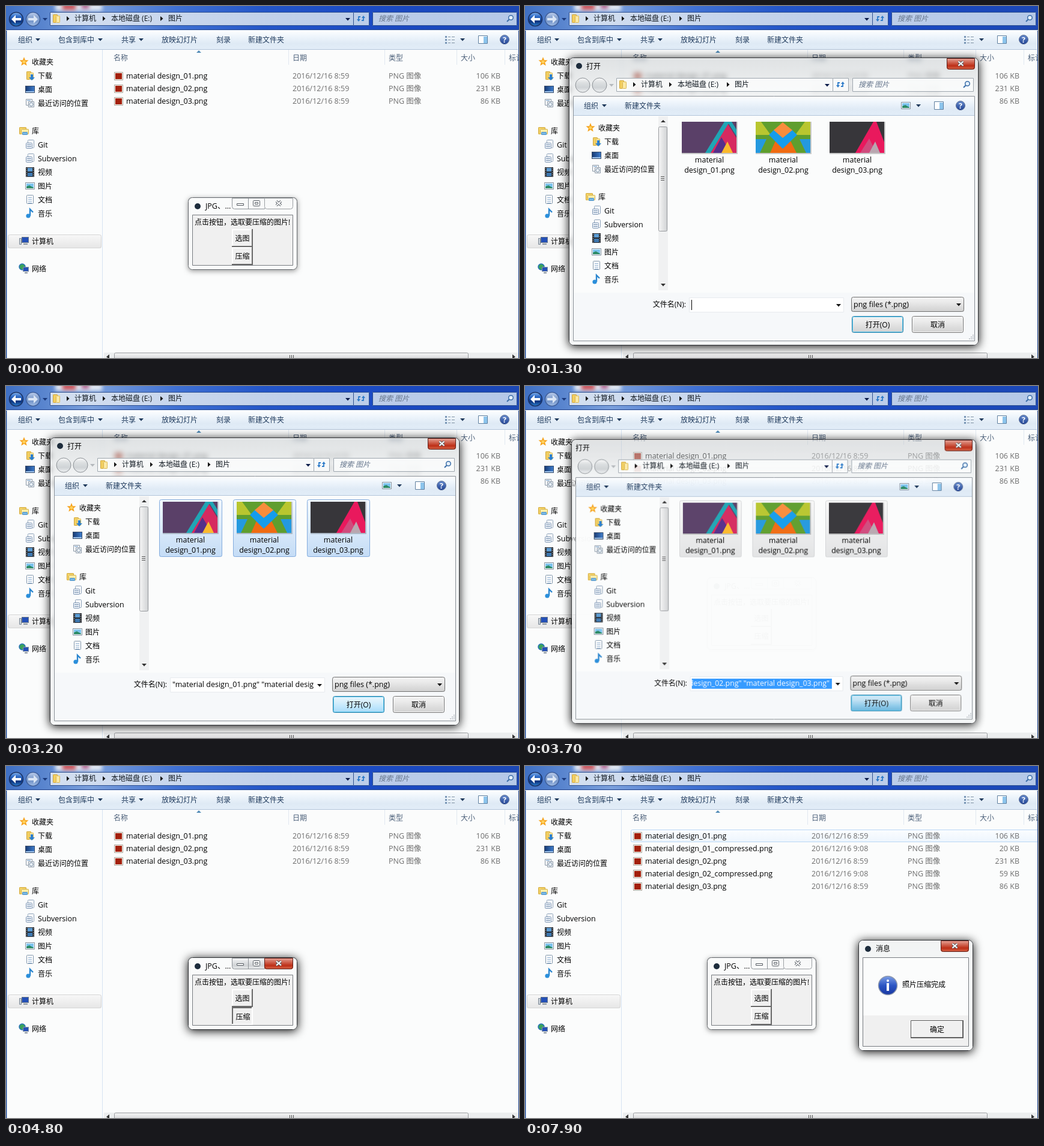
Write an HTML page with a canvas that moves like this. It is 854 px wide and 587 px high and loops after 8000 ms.

```html
<!DOCTYPE html>
<html lang="zh">
<head>
<meta charset="utf-8">
<style>
html, body { margin: 0; width: 100%; height: 100%; overflow: hidden; background: #fbfcfc; }
canvas { position: absolute; left: 0; top: 0; }
</style>
</head>
<body>
<canvas id="base" width="854" height="587"></canvas>
<canvas id="pop" width="854" height="587"></canvas>
<script>
const base = document.getElementById('base'), pop = document.getElementById('pop');
const baseCtx = base.getContext('2d'), popCtx = pop.getContext('2d');
let g = baseCtx;
const clamp = v => Math.max(0, Math.min(1, v));

// ---- drawing helpers
function grad(x0, y0, x1, y1, ...stops) {
  const f = g.createLinearGradient(x0, y0, x1, y1);
  stops.forEach((s, i) => f.addColorStop(i / (stops.length - 1), s));
  return f;
}
const down = (y, h, ...stops) => grad(0, y, 0, y + h, ...stops);
function rect(x, y, w, h, fill, stroke, r = 0) {
  if (fill) {
    g.fillStyle = fill;
    g.beginPath(); g.roundRect(x, y, w, h, r); g.fill();
  }
  if (stroke) {
    g.strokeStyle = stroke; g.lineWidth = 1;
    g.beginPath(); g.roundRect(x + .5, y + .5, w - 1, h - 1, r); g.stroke();
  }
}
function poly(x, y, fill, ...p) {
  g.fillStyle = fill;
  g.beginPath();
  for (let i = 0; i < p.length; i += 2) g.lineTo(x + p[i], y + p[i + 1]);
  g.fill();
}
function line(color, width, ...p) {
  g.strokeStyle = color; g.lineWidth = width;
  g.beginPath();
  for (let i = 0; i < p.length; i += 2) g.lineTo(p[i], p[i + 1]);
  g.stroke();
}
function disc(x, y, r, fill, stroke, width = 1) {
  g.beginPath(); g.arc(x, y, r, 0, 7);
  if (fill) { g.fillStyle = fill; g.fill(); }
  if (stroke) { g.strokeStyle = stroke; g.lineWidth = width; g.stroke(); }
}
function text(s, x, y, color = '#000', align = 'left', style = '') {
  const size = /^[\x00-\x7f]/.test(s) ? 12.5 : 12;
  g.font = `${style} ${size}px "Open Sans", "Noto Sans CJK SC", "Noto Sans CJK JP", sans-serif`;
  g.fillStyle = color; g.textAlign = align;
  g.fillText(s, x, y);
}
const arrowDown = (x, y, c = '#1e395b') => poly(x, y, c, -4, -2, 4, -2, 0, 2.5);
const arrowRight = (x, y) => poly(x, y, '#111', -2, -4, 2.5, 0, -2, 4);
function clipped(path, draw) {
  g.save(); g.beginPath(); path(); g.clip('evenodd'); draw(); g.restore();
}

// ---- icons, centred on x, y
const icons = {
  star(x, y) {
    const p = [];
    for (let i = 0; i < 10; i++) {
      const a = i * Math.PI / 5 - Math.PI / 2, r = i % 2 ? 3.4 : 8;
      p.push(Math.cos(a) * r, Math.sin(a) * r);
    }
    poly(x, y, '#f6a21c', ...p);
    disc(x, y, 2.6, '#ffd25a');
  },
  folder(x, y) {
    rect(x - 6, y - 7, 8, 14, '#f2cf61', '#cfa53c', 1);
    rect(x - 1, y - 5, 7, 12, '#fbe9a5', '#d9b550', 1);
  },
  down(x, y) {
    icons.folder(x, y);
    poly(x + 3, y + 3, '#2a7fd0', -2, -5, 2, -5, 2, 0, 5, 0, 0, 5, -5, 0, -2, 0);
  },
  desk(x, y) {
    rect(x - 8, y - 6, 16, 12, grad(x - 8, y, x + 8, y, '#16376f', '#3f7fd0'), '#3a4d68');
    rect(x - 7, y + 3, 14, 2, '#9ec2ea');
  },
  recent(x, y) {
    rect(x - 7, y - 7, 11, 11, '#f7f8f9', '#8d9aa8');
    rect(x - 3, y - 3, 10, 10, '#f7f8f9', '#8d9aa8');
    line('#6e9cc9', 1, x - 5, y - 4.5, x + 1, y - 4.5);
    disc(x + 2, y + 2, 3, '#e9f0f6', '#7c91a6');
  },
  lib(x, y) {
    rect(x - 8, y - 6, 12, 12, '#f5d467', '#cfa53c', 1);
    rect(x - 5, y - 3, 13, 9, '#fdeea9', '#d0ac48', 1);
    rect(x - 3, y + 2, 9, 5, '#78b8e6', '#4a8fc4', 1);
  },
  doc(x, y) {
    rect(x - 6, y - 8, 12, 15, '#fdfdfd', '#8196ab', 1);
    for (let i = -4; i < 6; i += 3) line('#8fb0d2', 1, x - 3, y + i + .5, x + 3, y + i + .5);
  },
  code(x, y) {
    rect(x - 4, y - 8, 11, 14, '#fdfdfd', '#8ba0b8', 1);
    rect(x - 7, y - 3, 11, 10, '#eef3f9', '#7d95b2', 1);
    line('#6b87a8', 1, x - 5, y + .5, x + 2, y + .5);
    line('#6b87a8', 1, x - 5, y + 3.5, x + 2, y + 3.5);
  },
  film(x, y) {
    rect(x - 7, y - 8, 14, 16, '#24282e');
    rect(x - 4, y - 7, 8, 6, '#5b9bd3'); rect(x - 4, y + 1, 8, 6, '#3e78b0');
    for (let i = -6; i < 8; i += 3) { rect(x - 6, y + i, 1, 1, '#fff'); rect(x + 5, y + i, 1, 1, '#fff'); }
  },
  pic(x, y) {
    rect(x - 8, y - 6, 16, 12, '#fff', '#7d8d9c');
    rect(x - 6, y - 4, 12, 8, '#7cc3ee');
    poly(x, y, '#2c8a66', -6, 4, -6, 1, -1, -1, 6, 3, 6, 4);
  },
  music(x, y) {
    line('#2b86cf', 2.4, x, y + 4, x, y - 7, x + 5, y - 2);
    disc(x - 3, y + 4, 3.6, '#2b8fdb');
  },
  pc(x, y) {
    rect(x - 8, y - 5, 4, 11, '#cfd6de', '#7c8894');
    rect(x - 4, y - 7, 12, 10, '#2450b8', '#707c8a');
    rect(x - 1, y + 4, 7, 2, '#8b95a0');
  },
  net(x, y) {
    disc(x - 3, y - 3, 5, '#3aa35c', '#2674b8', 1.5);
    rect(x - 2, y - 3, 10, 8, '#2450b8', '#8b95a0');
    rect(x + 1, y + 6, 5, 2, '#8b95a0');
  },
  glass(x, y) {
    disc(x + 1.5, y - 1.5, 3.8, '#e6f1fb', '#3b6ea8', 1.5);
    line('#3b6ea8', 2, x - 1.5, y + 1.5, x - 5, y + 5);
  },
  pane(x, y) {
    rect(x - 8, y - 7, 16, 14, '#fdfeff', '#5f7f9f');
    rect(x + 1, y - 5, 6, 11, '#8cc4ec');
  },
  help(x, y) {
    disc(x, y, 7.5, down(y - 8, 16, '#6b90d0', '#1c3f92'), '#5c6f96');
    text('?', x, y + 4.5, '#fff', 'center', 'bold');
  },
  png(x, y) {
    rect(x - 8, y - 7, 15, 14, '#fdfaf2', '#a9a39a');
    rect(x - 6, y - 5, 11, 10, '#a3200c');
  }
};

// ---- shared parts
const places = [
  ['star', '收藏夹', 0], ['down', '下载', 23], ['desk', '桌面', 46], ['recent', '最近访问的位置', 69],
  ['lib', '库', 115], ['code', 'Git', 138], ['code', 'Subversion', 161], ['film', '视频', 184],
  ['pic', '图片', 207], ['doc', '文档', 230], ['music', '音乐', 253]
];
function sidebar(x, y) {
  for (const [kind, label, dy] of places) {
    const dx = kind == 'star' || kind == 'lib' ? 0 : 10;
    icons[kind](x + dx, y + dy);
    text(label, x + 13 + dx, y + dy + 5);
  }
}
function addressBar(x, y, w, sx, sw, fill, border) {
  rect(x, y, w, 23, fill, border);
  rect(x + w - 1, y, 27, 23, fill, border);
  rect(sx, y, sw, 23, fill, border);
  icons.folder(x + 11, y + 11);
  [30, 90, 186].forEach(d => arrowRight(x + d, y + 11));
  text('计算机', x + 41, y + 15, '#101820');
  text('本地磁盘 (E:)', x + 102, y + 15, '#101820');
  text('图片', x + 197, y + 15, '#101820');
  arrowDown(x + w - 10, y + 12, '#0d1d4a');
  const rx = x + w + 12, ry = y + 11;
  line('#2f7cc9', 1.8, rx - 4, ry + 2, rx - 4, ry - 3, rx - 1, ry - 3);
  line('#2f7cc9', 1.8, rx + 4, ry - 2, rx + 4, ry + 3, rx + 1, ry + 3);
  poly(rx - 4, ry + 2, '#2f7cc9', -3, -1, 3, -1, 0, 3);
  poly(rx + 4, ry - 2, '#2f7cc9', -3, 1, 3, 1, 0, -3);
  text('搜索 图片', sx + 10, y + 15, '#65758c', 'left', 'italic');
  icons.glass(sx + sw - 12, y + 11);
}
function toolbar(x, y, w, h) {
  rect(x, y, w, h, down(y, h, '#fdfeff', '#edf4fb', '#dfeaf5', '#e2edf8'));
  rect(x, y + h - 1, w, 1, '#b3c5da');
}
function closeButton(x, y, w, active) {
  rect(x, y, w, 19, active ? down(y, 19, '#e8a79b', '#d26a57', '#bd2f17', '#d8694c') : '#f8f9f9',
    active ? '#5c1d17' : '#9b9fa3', [0, 0, 4, 4]);
  const cx = x + w / 2, cy = y + 9;
  const cross = (c, lw) => {
    line(c, lw, cx - 4, cy - 3.5, cx + 4, cy + 3.5);
    line(c, lw, cx + 4, cy - 3.5, cx - 4, cy + 3.5);
  };
  cross('#555b62', 4);
  cross('#fff', 2);
}
// Window frame: outer shadow, then glass over whatever lies below
function frame(x, y, w, h, active, blur) {
  const shape = () => g.roundRect(x, y, w, h, 7);
  clipped(() => { g.rect(0, 0, 854, 587); shape(); }, () => {
    g.shadowColor = active ? 'rgba(0,0,0,.95)' : 'rgba(0,0,0,.4)';
    g.shadowBlur = active ? 16 : 9;
    g.shadowOffsetY = 2;
    g.fillStyle = '#000';
    g.beginPath(); shape(); g.fill();
  });
  clipped(shape, () => {
    if (blur) {
      g.filter = 'blur(4px)';
      g.drawImage(base, 0, 0);
      g.filter = 'none';
    }
    rect(x, y, w, h, down(y, 70, 'rgba(190,195,198,.45)', 'rgba(238,240,241,.55)'));
  });
  rect(x, y, w, h, null, active ? '#2c2f33' : '#62666a', 7);
  rect(x + 1, y + 1, w - 2, h - 2, null, 'rgba(255,255,255,.85)', 6);
}
function button(x, y, w, h, label, state) {
  const fills = {
    hover: ['#eaf6fd', '#d9f0fc', '#bee6fd', '#a7d9f5'],
    press: ['#d5ecf8', '#c0e2f4', '#90cbeb', '#68b3db']
  };
  rect(x, y, w, h, down(y, h, ...(fills[state] || ['#f4f4f4', '#ebebeb', '#dddddd', '#d0d0d0'])),
    state ? '#2c7fa6' : '#707070', 3);
  rect(x + 1, y + 1, w - 2, h - 2, null, state ? '#5cc8ee' : '#fafafa', 2);
  text(label, x + w / 2, y + h / 2 + 4.5, '#000', 'center');
}
function bevel(x, y, w, h, label, pressed) {
  const [a, b] = pressed ? ['#696969', '#fff'] : ['#fff', '#696969'];
  rect(x, y, w, h, '#f0f0f0');
  line(a, 2, x + 1, y + h, x + 1, y + 1, x + w, y + 1);
  line(b, 2, x, y + h - 1, x + w - 1, y + h - 1, x + w - 1, y);
  const d = pressed ? 1 : 0;
  text(label, x + w / 2 + d, y + h / 2 + 4.5 + d, '#000', 'center');
}

// ---- file browser
const pic = (n, size, c) => [`material design_0${n}${c ? '_compressed' : ''}.png`, c ? '9:08' : '8:59', size];
const [one, two, three] = [pic(1, 106), pic(2, 231), pic(3, 86)];
const oneSmall = pic(1, 20, true), twoSmall = pic(2, 59, true);
function rowsAt(t) {
  if (t >= 7100) return [one, oneSmall, two, twoSmall, three];
  return t >= 6600 ? [one, two, three, oneSmall] : [one, two, three];
}
function explorer(t) {
  rect(0, 0, 854, 587, '#fbfcfc');
  rect(0, 0, 854, 41, grad(0, 0, 854, 0, '#3f70c4', '#7ba0dc', '#3f70d2', '#2456c8', '#1c4cc4', '#1a48be', '#1c48b4'));
  clipped(() => g.rect(0, 0, 854, 40), () => {
    g.filter = 'blur(3px)';
    rect(82, -4, 78, 12, '#e4e9f2');
    rect(94, -3, 22, 9, '#c8434a');
    rect(126, -3, 12, 7, '#a8467a');
    g.filter = 'none';
  });
  rect(0, 39, 854, 1, '#1d3f8b');
  rect(0, 40, 854, 1, '#dfeaf8');
  disc(17, 22, 11.5, down(10, 24, '#8db8ee', '#2b68c5', '#0c347f', '#2f86d6'), '#1b3263', 1.5);
  disc(45, 22, 11.5, down(10, 24, '#c3d3ee', '#8da8d4', '#7898cc', '#a6c1e8'), '#3f5f9b', 1.5);
  poly(17, 22, '#fff', -8, 0, -1, -7, -1, -2, 8, -2, 8, 2, -1, 2, -1, 7);
  poly(45, 22, '#dbe6f5', 8, 0, 1, -7, 1, -2, -8, -2, -8, 2, 1, 2, 1, 7);
  arrowDown(65, 22, '#19397d');
  addressBar(73, 10, 506, 610, 241, grad(73, 0, 851, 0, '#d3dff0', '#c0d0ea', '#b4c8e8'), '#2d4f8f');

  toolbar(2, 41, 850, 32);
  const menu = [['组织', 20, 53], ['包含到库中', 87, 157], ['共享', 192, 225], ['放映幻灯片', 259], ['刻录', 350], ['新建文件夹', 403]];
  for (const [label, x, arrow] of menu) {
    text(label, x, 61, '#1e395b');
    if (arrow) arrowDown(arrow, 56);
  }
  for (let i = 0; i < 3; i++) {
    rect(731, 50 + i * 5, 3, 3, '#7794b4');
    line('#8293a5', 1, 736, 51.5 + i * 5, 740, 51.5 + i * 5);
    line('#8293a5', 1, 742, 51.5 + i * 5, 747, 51.5 + i * 5);
  }
  arrowDown(760, 56);
  icons.pane(794, 56);
  icons.help(830, 56);

  rect(3, 381, 156, 23, down(381, 23, '#f8f8f8', '#e6e6e6'), '#d5d5d5', 3);
  sidebar(30, 93);
  icons.pc(30, 392); text('计算机', 43, 397);
  icons.net(30, 438); text('网络', 43, 443);
  rect(160, 73, 1, 514, '#d6e3f2');

  [470, 630, 750, 830].forEach(x => rect(x, 73, 1, 25, '#e1e8f0'));
  [['名称', 179], ['日期', 477], ['类型', 637], ['大小', 757], ['标记', 837]]
    .forEach(([s, x]) => text(s, x, 91, '#4c607a'));
  poly(321, 76, '#4f89b5', -4, 2, 0, -2, 4, 2);
  if (t >= 7800) rect(176, 106, 690, 21, down(106, 21, '#fbfdff', '#edf5fd'), '#b8d6f5', 2);
  rowsAt(t).forEach(([name, time, size], i) => {
    const y = 117 + i * 21;
    icons.png(188, y);
    text(name, 200, y + 4);
    text('2016/12/16 ' + time, 477, y + 4, '#6d6d6d');
    text('PNG 图像', 637, y + 4, '#6d6d6d');
    text(size + ' KB', 823, y + 4, '#6d6d6d', 'right');
  });

  rect(163, 578, 690, 9, '#eceeef');
  rect(180, 578, 590, 14, down(578, 9, '#f6f6f6', '#dcdddf'), '#979a9e', 2);
  [472, 475, 478].forEach(x => rect(x, 582, 1, 5, '#555'));
  poly(170, 585, '#333', 2, -4, -3, 0, 2, 4);
  poly(845, 585, '#333', -2, -4, 3, 0, -2, 4);
  rect(0, 41, 1, 546, '#1d448f'); rect(1, 41, 1, 546, '#a9c4ea');
  rect(853, 41, 1, 546, '#1d448f');
}

function toolWindow(t) {
  const active = t == 900 || (t >= 3900 && t < 7400);
  rect(303, 319, 182, 121, '#fbfcfc', null, 7);
  frame(303, 319, 182, 121, active);
  rect(305, 321, 178, 117, '#fafbfb', null, 5);
  disc(319, 334, 5, '#1d2c3c');
  text('JPG、...', 332, 338);
  rect(376, 320, 55, 19, active ? down(320, 19, '#fbfbfb', '#e2e4e6', '#cfd2d5', '#eceeef') : '#f8f9f9', '#8f9499', [0, 0, 0, 4]);
  rect(403, 320, 1, 19, '#8f9499');
  rect(384, 329, 12, 4, '#fff', '#555b62');
  rect(411, 324, 12, 10, '#fff', '#555b62', 1);
  rect(414, 327, 6, 4, '#fff', '#555b62');
  closeButton(430, 320, 48, active);
  rect(310, 348, 168, 85, '#f0f0f0', '#777b80');
  text('点击按钮，选取要压缩的图片!', 314, 365);
  bevel(376, 372, 35, 30, '选图', t == 900);
  bevel(376, 402, 35, 30, '压缩', t >= 4800 && t < 7400);
}

// ---- open dialog
function art(n, x, y) {
  clipped(() => g.rect(x, y, 91, 52), () => {
    const p = (fill, ...pts) => poly(x, y, fill, ...pts);
    if (n == 1) {
      p('#5a4068', 0, 0, 91, 0, 91, 52, 0, 52);
      p('#20a5b4', 39, 52, 71, 0, 80, 0, 48, 52);
      p('#20a5b4', 76, 0, 83, 0, 91, 13, 91, 24);
      p('#d62a60', 48, 52, 77, 4, 91, 27, 91, 52);
      p('#55308a', 52, 52, 66, 26, 82, 52);
      p('#fbb92d', 66, 52, 76, 33, 85, 52);
    } else if (n == 2) {
      p('#2499df', 0, 0, 91, 0, 91, 52, 0, 52);
      p('#b9c62f', 0, 0, 91, 0, 91, 25, 70, 30, 21, 30, 0, 25);
      p('#5f9e2e', 9, 0, 82, 0, 66, 22, 91, 22, 91, 29, 73, 29, 84, 52, 7, 52, 18, 29, 0, 29, 0, 22, 25, 22);
      p('#f06b12', 24, 52, 33, 32, 58, 32, 68, 52);
      p('#159cec', 22, 22, 31, 13, 45, 25, 60, 13, 69, 22, 45, 45);
      p('#f88d3c', 45, 1, 61, 14, 45, 27, 30, 14);
    } else {
      p('#37363a', 0, 0, 91, 0, 91, 52, 0, 52);
      p('#e9195d', 43, 52, 73, 0, 78, 0, 91, 34, 91, 52);
      p('#cf4c7d', 51, 52, 66, 28, 78, 52);
      p('#b9a7b0', 66, 52, 76, 33, 84, 52);
    }
  });
}
const quoted = list => list.map(n => `"material design_0${n}.png"`).join(' ');
function openDialog(t, still) {
  const closing = t >= 3600;
  frame(73, 86, 682, 480, true, still);
  if (!closing) disc(90, 100, 5, '#1d2c3c');
  text('打开', closing ? 80 : 102, 105);
  closeButton(702, 87, 47, true);
  for (const x of [96, 124]) disc(x, 132, 12, down(120, 24, '#fafafa', '#dcdfe1', '#cfd3d6', '#f0f2f3'), '#8b9095');
  arrowDown(144, 132, '#b5b9bd');
  addressBar(152, 120, 361, 545, 202, 'rgba(252,253,253,.85)', '#9ea6ae');

  rect(80, 150, 669, 409, '#fbfcfc', '#8a9097');
  toolbar(81, 151, 667, 32);
  text('组织', 98, 171, '#1e395b'); arrowDown(132, 166);
  text('新建文件夹', 166, 171, '#1e395b');
  icons.pic(634, 166); arrowDown(655, 166);
  icons.pane(689, 166); icons.help(725, 166);
  sidebar(109, 203);
  rect(222, 184, 16, 290, '#f0f1f2');
  rect(222, 201, 15, 175, grad(222, 0, 237, 0, '#f7f7f7', '#e3e4e5', '#cfd1d3'), '#979a9e', 2);
  [284, 287, 290].forEach(y => rect(226, y, 6, 1, '#555'));
  poly(230, 192, '#333', -4, 2, 0, -2, 4, 2);
  arrowDown(230, 465, '#333');
  rect(81, 478, 667, 80, '#f6f8fa');

  // Rubber band grows from its lower right corner
  const p = Math.min(1.47, (t - 2000) / 300);
  const bx = 638 - 261 * p, by = 342 - 78 * p;
  const picked = [1, 2, 3].filter(n => p > 0 && by < 285 && bx < 238 + 123 * n);
  for (const n of [1, 2, 3]) {
    const x = 132 + 123 * n;
    if (picked.includes(n))
      rect(x, 189, 105, 96, closing ? down(189, 96, '#f8f8f8', '#e3e4e5') : down(189, 96, '#f2f8fe', '#c4dcf6'),
        closing ? '#d4d6d8' : '#84acdd', 3);
    rect(x + 6, 193, 93, 54, 'rgba(0,0,0,.2)');
    art(n, x + 6, 193);
    text('material', x + 52, 261, '#000', 'center');
    text(`design_0${n}.png`, x + 52, 278, '#000', 'center');
  }
  if (p > 0 && t < 2700) rect(bx, by, 639 - bx, 343 - by, 'rgba(51,137,220,.42)', '#3399ff');

  text('文件名(N):', 268, 502, '#000', 'right');
  rect(273, 486, 258, 25, '#fff', '#e7eaee');
  arrowDown(522, 499, '#111');
  clipped(() => g.rect(276, 486, 236, 25), () => {
    if (closing) {
      rect(276, 490, 236, 17, '#3399ff');
      text(quoted(picked), 508, 502, '#fff', 'right');
    } else text(quoted(picked), 277, 502);
  });
  if (!picked.length) rect(277, 490, 1, 17, '#000');
  rect(543, 485, 188, 25, down(485, 25, '#f4f4f4', '#ebebeb', '#dddddd', '#d0d0d0'), '#707070', 3);
  text('png files (*.png)', 547, 502);
  arrowDown(722, 498, '#111');
  button(544, 517, 86, 28, '打开(O)', t >= 3300 ? 'press' : t >= 3200 ? 'hover' : 'default');
  button(644, 517, 86, 28, '取消');
  for (let i = 0; i < 3; i++)
    for (let j = 0; j <= i; j++) rect(745 - j * 3, 548 + i * 3, 2, 2, '#c3c8cd');
}

function messageBox(still) {
  frame(555, 290, 191, 185, true, still);
  rect(557, 292, 187, 181, 'rgba(250,251,251,.7)', null, 5);
  disc(571, 305, 5, '#1d2c3c');
  text('消息', 584, 309);
  closeButton(692, 291, 47, true);
  rect(562, 319, 177, 149, '#f0f0f0', '#777b80');
  rect(563, 320, 175, 96, '#fbfcfc');
  disc(604, 366, 15.5, down(350, 32, '#7fa0e6', '#2b55c4', '#1736a0'), '#8e99ad', 1.5);
  rect(602, 356, 4, 4, '#fff', null, 2);
  rect(602, 362, 4, 13, '#fff');
  text('照片压缩完成', 628, 369);
  bevel(642, 424, 88, 30, '确定');
  rect(642, 424, 88, 30, null, '#555');
}

// ---- timeline
function draw(t) {
  g = baseCtx;
  explorer(t);
  toolWindow(t);

  g = popCtx;
  g.clearRect(0, 0, 854, 587);
  const message = t >= 7400, dialog = t >= 900 && t < 3900;
  if (!message && !dialog) return;
  const k = clamp(message ? (t - 7300) / 400 : (t - 900) / 400), out = 1 - k;
  const q = dialog ? Math.max(0, (t - 3600) / 100) : 0;
  const still = k == 1 && q == 0;
  if (message) messageBox(still); else openDialog(t, still);
  pop.style.opacity = clamp(k * 1.2) * (1 - .02 * q ** 3);
  pop.style.transformOrigin = message ? '650px 382px' : '414px 326px';
  pop.style.transform = still ? 'none' :
    `perspective(1000px) translate3d(0,${-6 * out}px,${-110 * out}px) rotateX(${-9.2 * out}deg) scale(${1 - .012 * q})`;
}
let last = -1;
function tick() {
  const t = Math.floor(performance.now() % 8000 / 100) * 100;
  if (t != last) draw(last = t);
  requestAnimationFrame(tick);
}
tick();
</script>
</body>
</html>
```
